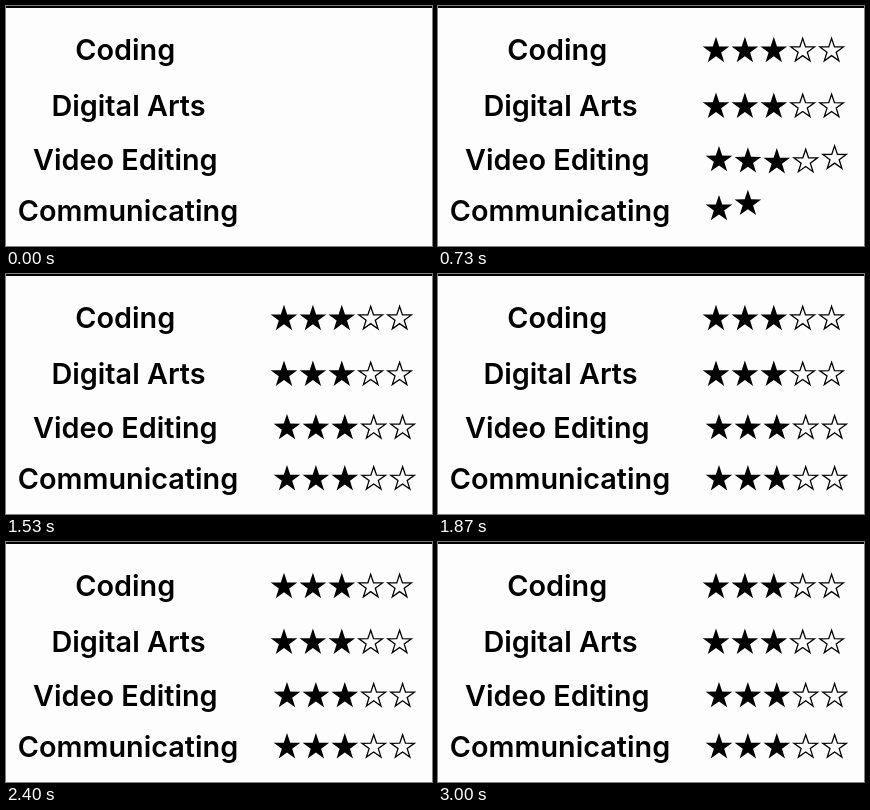
An HTML page with a canvas for the animation above (3070 ms loop, 426x240 px).

```html
<!DOCTYPE html>
<html lang="en">
<head>
<meta charset="utf-8">
<title>Skills</title>
<style>
html, body { margin: 0; width: 100%; height: 100%; overflow: hidden; background: #fdfdfd; }
canvas { display: block; width: 426px; height: 240px; }
</style>
</head>
<body>
<canvas id="stage" width="426" height="240"></canvas>
<script>
const ctx = document.getElementById('stage').getContext('2d');
const LOOP = 3070, FPS = 15, STAGGER = 41, PITCH = 28.9, RADIUS = 14;

const rows = [
  { label: 'Coding', x: 119.3, base: 54, starX: 278, starY: 44.8, start: 46 },
  { label: 'Digital Arts', x: 122.5, base: 110, starX: 278, starY: 100.6, start: 247 },
  { label: 'Video Editing', x: 119.3, base: 163.5, starX: 281, starY: 154, start: 490 },
  { label: 'Communicating', x: 122, base: 214.5, starX: 281, starY: 205.1, start: 659 }
];

// Drop from above, slight overshoot, then settle.
const path = [[0, -12], [30, -7.8], [71, -2.5], [112, 1.5], [153, 2.2], [194, 1.5], [240, 0]];

function offset(age) {
  for (let i = 1; i < path.length; i++) {
    const [t0, y0] = path[i - 1], [t1, y1] = path[i];
    if (age < t1) return y0 + (y1 - y0) * (age - t0) / (t1 - t0);
  }
  return 0;
}

function star(x, y, r, filled) {
  ctx.beginPath();
  for (let i = 0; i < 10; i++) {
    const a = i * Math.PI / 5, d = i % 2 ? r * 0.39 : r;
    ctx.lineTo(x + d * Math.sin(a), y - d * Math.cos(a));
  }
  ctx.closePath();
  if (filled) ctx.fill();
  else ctx.stroke();
}

function draw(t) {
  ctx.fillStyle = '#fdfdfd';
  ctx.fillRect(0, 0, 426, 240);
  ctx.fillStyle = ctx.strokeStyle = '#000';
  ctx.fillRect(0, 0, 426, 2);
  ctx.lineWidth = 1.3;
  ctx.font = '600 28.8px Inter, "Noto Sans", sans-serif';
  ctx.textAlign = 'center';
  for (const row of rows) {
    ctx.fillText(row.label, row.x, row.base);
    for (let i = 0; i < 5; i++) {
      const age = t - row.start - i * STAGGER;
      if (age < 0) continue;
      const filled = i < 3;
      star(row.starX + i * PITCH, row.starY + offset(age), filled ? RADIUS : RADIUS - 1.6, filled);
    }
  }
}

const begin = performance.now();
function tick() {
  const t = (performance.now() - begin) % LOOP;
  draw(Math.floor((t + 4) * FPS / 1000) * 1000 / FPS);
  requestAnimationFrame(tick);
}
tick();
</script>
</body>
</html>
```
